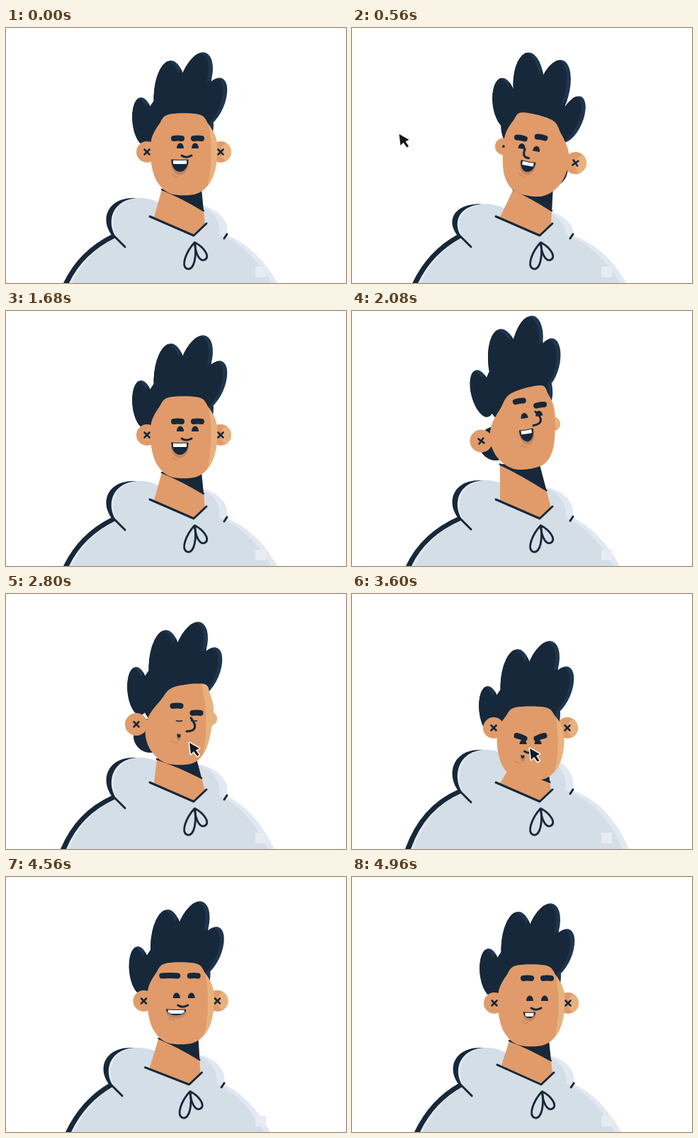
An HTML page with a canvas that plays this animation: 480x360 px, repeating every 5 s.

```html
<!DOCTYPE html>
<html lang="en">
<head>
<meta charset="utf-8">
<title>Character and pointer</title>
<style>
  html, body { margin: 0; width: 100%; height: 100%; overflow: hidden; background: #fff; }
  canvas { display: block; width: 480px; height: 360px; }
</style>
</head>
<body>
<canvas id="stage" width="480" height="360"></canvas>
<script>
const ctx = document.getElementById('stage').getContext('2d');
const LOOP = 5000;
const INK = '#16283a', TINT = '#1f354d', SKIN = '#e19b6a', GLOW = '#e7b27d', LIP = '#c28560';
const CLOTH = '#d4dee7', SHEEN = '#e1e8f2', BADGE = '#e6ecf2', CREASE = '#cd8961';

// Tip, root and half width of each tuft, relative to the head pivot
const TUFTS = [
  { tip: [-61, -77], root: [-54, -9], width: 15 },
  { tip: [-18, -129], root: [-21, -25], width: 23 },
  { tip: [31, -140], root: [2, -60], width: 21 },
  { tip: [54, -104], root: [24, -35], width: 18 }
];
// One half of the face in units of half width and height, from forehead to chin
const HALF_FACE = [[0.45, 0], [0.74, 0.12], [0.98, 0.32], [0.98, 0.6], [0.79, 0.84], [0.37, 0.985]];

const happy = {
  x: 251, y: 175, tilt: 0, turn: 0, nod: 0, lookX: 5.5, lookY: -8, brow: 11, frown: 0, lid: 1,
  mouthW: 23, mouthH: 17, hood: 240, lean: 0, girth: 151, shift: 0, squint: 0
};
const pose = changes => ({ ...happy, ...changes });
const left = pose({ x: 250, y: 171, tilt: 17, turn: -1, nod: 6, lookX: -5, lookY: 0, brow: 17,
  mouthW: 18, mouthH: 13, hood: 254, lean: 7 });
const up = pose({ x: 247, y: 150, tilt: -9, turn: 1, nod: 19, lookX: 7, lookY: -2, brow: 17,
  mouthW: 19, hood: 239, lean: -5 });
const right = pose({ x: 244, y: 180, turn: 1, lookX: 11, lookY: -1, brow: 16, lid: 0,
  mouthW: 4, mouthH: 5, hood: 231, lean: -4 });
const down = pose({ x: 252, y: 207, nod: -18, lookX: 0, lookY: 2, brow: 7, frown: 1, lid: 0.7,
  mouthW: 4, mouthH: 4, hood: 220, lean: 1, girth: 158 });
const squeeze = pose({ x: 240, y: 179, lookX: 1, brow: 28, mouthW: 38, mouthH: 8, squint: 1,
  hood: 241, lean: -9, girth: 143, shift: -15 });
const calm = pose({ x: 253, y: 178, lookX: 8.5, lookY: -6, brow: 29, mouthW: 16, mouthH: 8,
  hood: 241, lean: 2, girth: 146, shift: 2 });

const POSES = [
  [0, happy], [240, happy], [800, left], [1280, left], [1680, happy], [2000, up], [2160, up],
  [2640, right], [3040, right], [3440, down], [3680, down], [3920, squeeze], [4400, squeeze],
  [4720, { ...calm, y: 171 }], [4960, calm], [LOOP, happy]
];
const POINTER_PATHS = [
  [[480, { x: 66, y: 150 }], [1120, { x: 78, y: 143 }], [1440, { x: 84, y: 140 }]],
  [[2480, { x: 330, y: 262 }], [2800, { x: 259, y: 210 }], [3600, { x: 251, y: 218 }], [3840, { x: 250, y: 216 }]]
];

const mix = (a, b, k) => a + (b - a) * k;

function sample(keys, t) {
  const i = Math.max(1, keys.findIndex(k => k[0] > t));
  const [t0, a] = keys[i - 1], [t1, b] = keys[i];
  const u = (t - t0) / (t1 - t0), k = u * u * (3 - 2 * u);
  return Object.fromEntries(Object.keys(a).map(name => [name, mix(a[name], b[name], k)]));
}

function spline(pts) {
  const n = pts.length, path = new Path2D(), at = i => pts[(i + n) % n];
  path.moveTo(...pts[0]);
  for (let i = 0; i < n; i++) {
    const [p, a, b, q] = [at(i - 1), at(i), at(i + 1), at(i + 2)];
    path.bezierCurveTo(a[0] + (b[0] - p[0]) / 6, a[1] + (b[1] - p[1]) / 6,
      b[0] - (q[0] - a[0]) / 6, b[1] - (q[1] - a[1]) / 6, b[0], b[1]);
  }
  path.closePath();
  return path;
}
function ellipse(x, y, rx, ry = rx, angle = 0) {
  const path = new Path2D();
  path.ellipse(x, y, rx, ry, angle, 0, Math.PI * 2);
  return path;
}
const toPath = shape => typeof shape === 'string' ? new Path2D(shape) : shape;
function fill(shape, color) {
  ctx.fillStyle = color;
  ctx.fill(toPath(shape));
}
function stroke(shape, width, color = INK) {
  ctx.strokeStyle = color;
  ctx.lineWidth = width;
  ctx.stroke(toPath(shape));
}
function clipped(path, draw) {
  ctx.save();
  ctx.clip(path);
  draw();
  ctx.restore();
}

function drawBody({ hood, lean, girth, shift }) {
  const l = 232 + lean - girth, r = 232 + lean + girth;
  const h = shift * 0.6, rise = Math.min(0, hood - 240) * 0.75;
  const join = 292 + rise;
  const torso = (a, b, inset) => `M${a} 360 Q${a + 20} ${318 + rise} ${155 + h} ${join + 4}
    L190 ${join - 25} L${285 + h} ${join - 12} L${311 + h - inset} ${join}
    Q${b - 28} ${310 + rise} ${b} 360 Z`;
  const hoodRight = d => `M255 ${hood + 8} C${300 + h - d} ${hood + 8} ${318 + h - d} ${hood + 35}
    ${311 + h - d} ${join + 2} L265 300 Z`;
  const hoodLeft = d => `M${167 + h} ${join + 16} C${128 + h + d} ${join - 7} ${135 + h + d} ${hood}
    ${180 + h + d} ${hood} Q215 ${hood + 2} 225 ${hood + 15} L260 300 Z`;
  fill(`M${l} 360 Q${l + 22} ${314 + rise} ${150 + h} ${join - 1} L${170 + h} ${join + 18} L${l + 40} 360 Z`, INK);
  fill(torso(l + 8, r, 0), SHEEN);
  fill(hoodRight(0), SHEEN);
  fill(hoodRight(11), CLOTH);
  fill(hoodLeft(0), INK);
  fill(hoodLeft(9), SHEEN);
  fill(hoodLeft(13), CLOTH);
  fill(torso(l + 12, r - 9, 9), CLOTH);
  stroke(`M${151 + h} ${join} l17 17`, 3);
  stroke(`M${308 + h} ${join + 5} l4 -6`, 3);
  drawCord(266 + shift, 303, -10, 37, 8);
  drawCord(267 + shift, 303, 14, 24, 7);
}
function drawCord(x, y, dx, dy, width) {
  const d = Math.hypot(dx, dy), nx = dy / d * width, ny = -dx / d * width;
  const side = s => [x + dx * 0.4 + nx * s, y + dy * 0.4 + ny * s];
  const end = s => [x + dx + nx * s, y + dy + ny * s];
  stroke(`M${x} ${y} C${side(-1)} ${end(-1.3)} ${x + dx} ${y + dy} C${end(1.3)} ${side(1)} ${x} ${y}`, 2.8);
}

function drawNeck({ x, y, tilt, nod, shift }) {
  const cx = x - 3 + tilt * 0.8, top = y + 53 + nod * 0.7;
  const [lx, rx, edge] = [cx - 28, cx + 28, 281 + shift];
  const sx = mix(rx, edge, 0.6), sy = mix(top, 278, 0.6), drop = shift * -0.45;
  fill(`M${lx} ${top} L${209 + shift} ${267 + drop} L${265 + shift} 293 L${edge} 278 L${rx} ${top} Z`, SKIN);
  const under = `M${lx} ${top} Q${(lx + sx) / 2 - 2} ${(top + sy) / 2 - 4} ${sx} ${sy}`;
  fill(`${under} L${rx} ${top} Z`, INK);
  stroke(under, 2.4);
  stroke(`M${203 + shift} ${266 + drop} L${265 + shift} 293 L${283 + shift} 276`, 3);
}

function drawHair({ turn, nod }, slide) {
  const flip = Math.max(0, -turn);
  const hair = ellipse(mix(-6, 6, flip), -38, 48, 52);
  hair.addPath(ellipse(slide - turn * 32, 20 + nod * 0.5, 24));
  TUFTS.forEach((tuft, i) => {
    const other = TUFTS[3 - i];
    const blend = key => [mix(tuft[key][0], -other[key][0], flip), mix(tuft[key][1], other[key][1], flip)];
    const [x, y] = blend('tip'), [rx, ry] = blend('root');
    hair.addPath(ellipse((x + rx) / 2, (y + ry) / 2, Math.hypot(rx - x, ry - y) / 2,
      mix(tuft.width, other.width, flip), Math.atan2(ry - y, rx - x)));
  });
  fill(hair, TINT);
  clipped(hair, () => {
    ctx.translate(-6, 1);
    fill(hair, INK);
  });
}

function facePath({ turn, nod }, slide) {
  const top = -53 + nod * (nod > 0 ? 0.6 : -0.33), height = 114 + Math.min(0, nod) * 0.6;
  const bend = ([u, v]) => {
    const back = Math.max(0, -turn * Math.sign(u));
    const du = turn * (0.46 * (1 - v) ** 2 + 0.2 * v * v);
    const dv = back * 0.2 * u * u * (1 - v) ** 2;
    return [slide + 47 * (u + du), top + height * (v + dv)];
  };
  const mirrored = HALF_FACE.map(([u, v]) => [-u, v]).reverse();
  return spline([...HALF_FACE, ...mirrored].map(bend));
}

function drawFace(p, slide) {
  const ears = [-1, 1].map(side => {
    const back = -side * p.turn;
    return { side, x: slide + side * 52, y: p.nod + 4 * back, r: 15 + (back > 0 ? 1 : 5) * back };
  });
  for (const { side, x, y, r } of ears) {
    const ear = ellipse(x, y, r);
    fill(ear, SKIN);
    if (side > 0) clipped(ear, () => fill(ellipse(x + r, y, r), GLOW));
  }
  const face = facePath(p, slide);
  fill(face, SKIN);
  const edge = 45 * Math.max(0, -p.turn);
  clipped(face, () => fill(`M${30 + edge} -60 Q${50 + edge} 10 ${24 + edge} 80 H150 V-60 Z`, GLOW));
  for (const { x, y, r } of ears) {
    const d = Math.min(3.5, r - 11.5);
    if (d > 0) stroke(`M${x - d} ${y - d} l${2 * d} ${2 * d} M${x + d} ${y - d} l${-2 * d} ${2 * d}`, 2.6);
  }
}

function drawEye(x, y, open) {
  if (open < 0.25) return stroke(`M${x - 4} ${y} Q${x} ${y + 1} ${x + 4} ${y}`, 1.6);
  const peak = y - 7 * open;
  fill(`M${x - 5} ${y + 3} C${x - 5} ${peak} ${x + 5} ${peak} ${x + 5} ${y + 3} Z`, INK);
}

function drawMouth(cx, top, w, h) {
  const shape = (y, width, height) => {
    const a = cx - width / 2, b = cx + width / 2, low = y + height * 1.3;
    return new Path2D(`M${a} ${y} Q${cx} ${y + 1} ${b} ${y} C${b} ${low} ${a} ${low} ${a} ${y} Z`);
  };
  fill(shape(top + 1, w + 3, h + 4), LIP);
  const mouth = shape(top, w, h), teeth = Math.min(6, (h - 5) * 2);
  fill(mouth, INK);
  if (teeth > 0) clipped(mouth, () => {
    ctx.fillStyle = '#fff';
    ctx.fillRect(cx - w / 2 + 2, top, w - 4, teeth);
  });
  stroke(mouth, 1);
  stroke(`M${cx - 10} ${top + h + 4} q2 3 7 3`, 2, CREASE);
}

function drawSqueezed(x, y) {
  stroke(`M${x - 38} ${y - 3} h25 q7 3 0 6 h-25`, 3);
  stroke(`M${x + 16} ${y - 3} l-9 4 l9 4`, 3);
  const bar = y + 23;
  fill(`M${x - 17} ${bar + 3} Q${x - 3} ${bar + 13} ${x + 1} ${bar} Z`, LIP);
  stroke(`M${x - 4} ${bar} v2`, 6);
  stroke(`M${x - 36} ${bar} h30`, 6, '#fff');
  stroke(`M${x - 24} ${bar + 15} l7 3`, 2, CREASE);
}

function drawFeatures({ lookX: x, lookY: y, turn, brow, frown, lid, mouthW, mouthH, squint }) {
  for (const side of [-1, 1]) {
    const stretch = side < 0 ? squint : 0, half = 5.5 + 11 * stretch;
    const bx = x + side * 14 - 12 * stretch, by = y - brow + 5 * side * turn, slope = -side * frown * 2;
    stroke(`M${bx - half} ${by - slope} Q${bx} ${by - 1} ${bx + half} ${by + slope}`, 8);
  }
  if (squint > 0.5) drawSqueezed(x, y);
  else {
    drawEye(x - 10.5, y, lid);
    drawEye(x + 10.5, y, lid);
    drawMouth(x - 11 * (1 + 2 * Math.min(0, turn)), y + 19, mouthW, mouthH);
  }
  const k = Math.abs(turn);
  const point = (a, b, c, d) => [x + mix(a, c * turn, k), y + mix(b, d, k)];
  stroke(`M${point(-8.5, 13, 6, -4)} Q${point(-2, 17.5, 20, 14)} ${point(5.5, 13, 0, 15)}`, 3);
}

function drawHead(p) {
  const slide = p.tilt - 8 * p.turn;
  ctx.save();
  ctx.translate(p.x, p.y);
  ctx.rotate(p.tilt * Math.PI / 180);
  drawHair(p, slide);
  drawFace(p, slide);
  drawFeatures(p, slide);
  ctx.restore();
}

function drawPointer({ x, y }) {
  const arrow = `M${x} ${y} l2 16 l4 -4 l5 7 l2.5 -2 l-4.5 -6.5 l5 -2.5 Z`;
  stroke(arrow, 3, '#fff');
  fill(arrow, '#14181f');
}

function render(now) {
  const raw = now % LOOP, step = raw < 80 ? 40 : 80;
  const t = Math.floor(raw / step) * step;
  const current = sample(POSES, t);
  ctx.fillStyle = '#fff';
  ctx.fillRect(0, 0, 480, 360);
  ctx.lineCap = ctx.lineJoin = 'round';
  drawBody(current);
  ctx.fillStyle = BADGE;
  ctx.fillRect(352, 337, 15, 15);
  drawNeck(current);
  drawHead(current);
  const path = POINTER_PATHS.find(keys => t >= keys[0][0] && t < keys[keys.length - 1][0]);
  if (path) drawPointer(sample(path, t));
}

const start = performance.now();
function tick() {
  render(performance.now() - start);
  requestAnimationFrame(tick);
}
tick();
</script>
</body>
</html>
```
